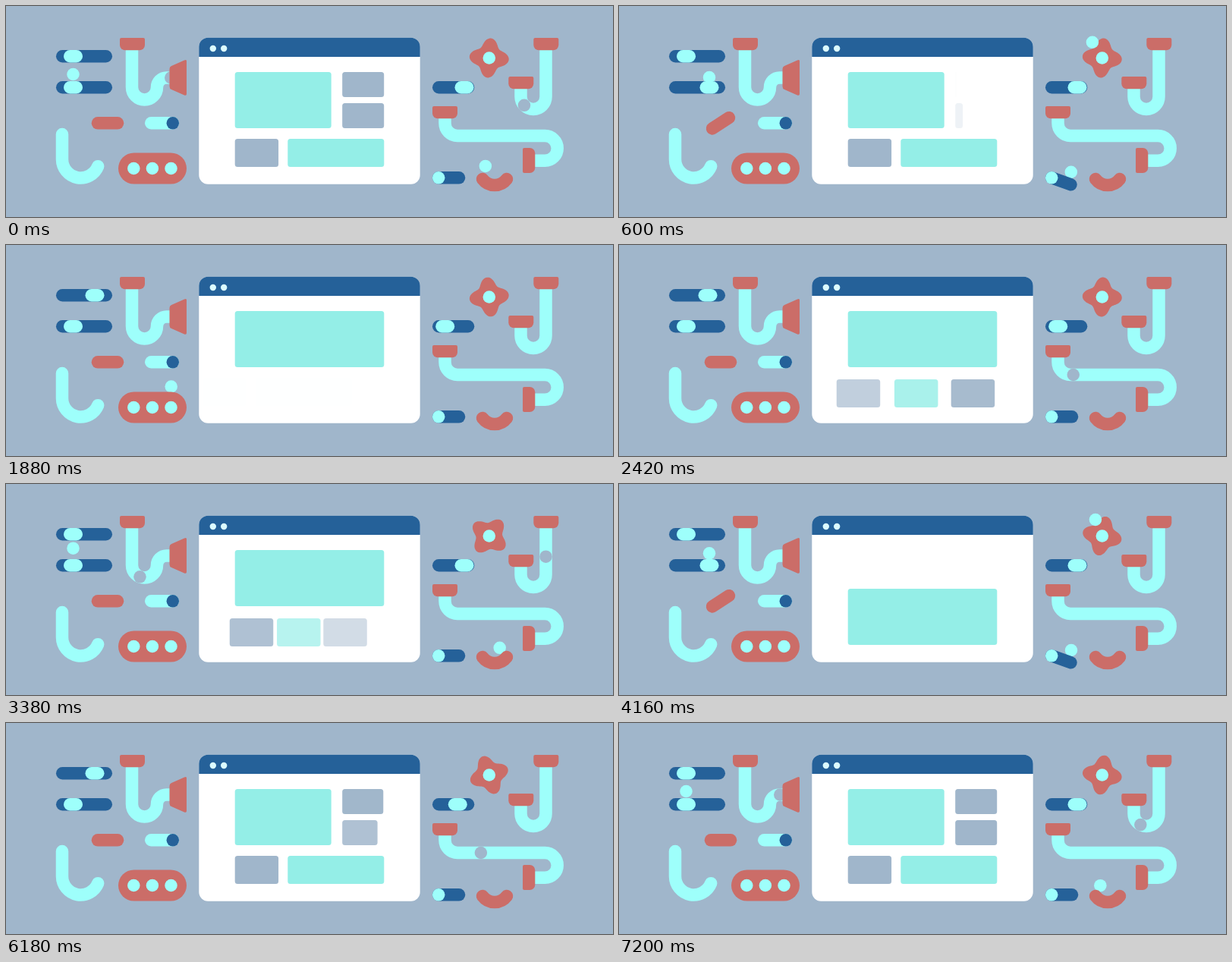
Write an HTML page with a canvas that moves like this. It is 800 px wide and 278 px high and loops after 7.22 s.

```html
<!DOCTYPE html>
<html lang="en">
<head>
<meta charset="utf-8">
<title>Page machine</title>
<style>
html, body { margin: 0; width: 100%; height: 100%; overflow: hidden; background: #a0b6cb; }
canvas { display: block; width: 800px; height: 278px; }
</style>
</head>
<body>
<canvas id="stage" width="800" height="278"></canvas>
<script>
const LOOP = 7220, RUN = LOOP / 2;   // the balls run twice per loop
const GRAVITY = 1045;                // px per second squared
const BG = '#a0b6cb', BLUE = '#256199', MINT = '#9efffb', PANEL = '#94eee7', RED = '#cb6d68';
const ctx = document.getElementById('stage').getContext('2d');

const clamp = v => Math.max(0, Math.min(1, v));
const lerp = (a, b, u) => a + (b - a) * u;
const smooth = u => u * u * (3 - 2 * u);
const ramp = (t, a, b) => smooth(clamp((t - a) / (b - a)));
const pulse = (t, a, b, c, d) => ramp(t, a, b) - ramp(t, c, d);

function box(x, y, w, h, r, color, alpha = 1) {
  if (alpha <= 0 || w <= 0) return;
  ctx.globalAlpha = alpha;
  ctx.fillStyle = color;
  ctx.beginPath();
  ctx.roundRect(x, y, w, h, r);
  ctx.fill();
  ctx.globalAlpha = 1;
}
const pill = (x, y, w, color) => box(x, y, w, 16.5, 8.25, color);
const cap = (x, y) => box(x, y, 33, 16.3, [2, 2, 7, 7], RED);

function dot(x, y, color = MINT, r = 8.25) {
  ctx.fillStyle = color;
  ctx.beginPath();
  ctx.arc(x, y, r, 0, 7);
  ctx.fill();
}

function turned(x, y, deg, draw) {
  ctx.save();
  ctx.translate(x, y);
  ctx.rotate(deg * Math.PI / 180);
  draw();
  ctx.restore();
}

// A tube that can be stroked and measured along its length
function tube(d) {
  const el = document.createElementNS('http://www.w3.org/2000/svg', 'path');
  el.setAttribute('d', d);
  return { shape: new Path2D(d), length: el.getTotalLength(), at: s => el.getPointAtLength(s) };
}
function stroke(shape, color, ends = 'butt') {
  ctx.strokeStyle = color;
  ctx.lineWidth = 16.5;
  ctx.lineCap = ends;
  ctx.stroke(shape);
}
function flow(pipe, s) {
  if (s <= 0 || s >= pipe.length) return;
  const q = pipe.at(s);
  dot(q.x, q.y, BG);
}

const sPipe = tube('M166 50V107A16.5 16.5 0 0 0 199 107A12.5 12.5 0 0 1 211.5 94.5H238');
const uPipe = tube('M711.5 50V119.5A16.5 16.5 0 0 1 678.5 119.5V101');
const longPipe = tube('M578.5 140V154.5A16.5 16.5 0 0 0 595 171H710.3A16.4 16.4 0 0 1 710.3 203.8H688');
const hook = new Path2D('M74 169V202A24.5 24.5 0 0 0 121.2 211.2');
const smile = new Path2D('M628 228A20 20 0 0 0 660 228');
const funnel = new Path2D('M215.5 83Q215.5 80 218 79L235 71.5Q238 70 238 72.5V116Q238 118.5 235 117.5L218 110Q215.5 109 215.5 106Z');

// Draws a ball on a chain of legs: roll is steady, ride is eased, fly is ballistic
function ball(p, t, x, y) {
  function leg(ms, nx, ny, ease, g) {
    for (const now of [p, p + RUN]) {
      if (now < t || now >= t + ms) continue;
      const u = (now - t) / ms, s = ease ? smooth(u) : u;
      dot(lerp(x, nx, s), lerp(y, ny, s) - g / 2 * (ms / 1000) ** 2 * u * (1 - u));
    }
    t += ms;
    x = nx;
    y = ny;
    return chain;
  }
  const chain = {
    roll: (ms, nx = x, ny = y) => leg(ms, nx, ny, false, 0),
    ride: (ms, nx, ny = y) => leg(ms, nx, ny, true, 0),
    fly: (ms, nx, ny, g = GRAVITY) => leg(ms, nx, ny, false, g)
  };
  return chain;
}

function balls(p) {
  // Out of the cap, through both sliders, over hook and conveyor, into the page
  ball(p, 2750, 160, 50).roll(170, 117).ride(180, 88.5).roll(20).fly(280, 88.5, 90)
    .roll(340).ride(350, 119, 91).roll(50).fly(440, 119, 195)
    .roll(230).fly(300, 176, 186.5).roll(420, 222).fly(230, 266, 200);
  // Out of the funnel
  ball(p, 80, 238, 94.5).roll(90, 264);
  // Over the gear, onto the slider, into the long pipe
  ball(p, 140, 678.5, 101).fly(410, 628, 47, 1.65 * GRAVITY).fly(300, 604, 90.5)
    .roll(350).ride(330, 578.7).roll(30).fly(300, 578.7, 140);
  // Out of the long pipe, off the cradle, flipped into the page
  ball(p, 3230, 688, 203.8).fly(170, 646, 219).roll(165, 637.6).fly(345, 594.5, 212)
    .ride(180, 596, 219).roll(120).fly(300, 534, 200);
}

function slider(x, y, w, knob) {
  pill(x, y, w, BLUE);
  pill(knob - 12.5, y, 25, MINT);
}

function gear(p) {
  turned(636.8, 68.5, 5 - 540 * p / RUN, () => {
    ctx.fillStyle = RED;
    ctx.beginPath();
    for (let a = 0; a < 2 * Math.PI; a += Math.PI / 60) {
      const r = 21.7 + 4.3 * Math.cos(4 * a);
      ctx.lineTo(r * Math.cos(a), r * Math.sin(a));
    }
    ctx.fill();
  });
  dot(636.8, 68.5);
}

function leftSide(p) {
  const late = p < RUN / 2 ? p + RUN : p;   // pipe balls cross the end of a run
  slider(66, 58, 74, 88.5 + 28.5 * pulse(p, 600, 900, 2920, 3100));
  slider(66, 99, 74, 88.5 + 30.5 * pulse(p, 130, 480, 650, 950));

  stroke(sPipe.shape, MINT);
  flow(sPipe, 0.25 * (late - 3074));
  cap(150, 42);
  ctx.fillStyle = RED;
  ctx.fill(funnel);

  turned(134, 154.3, -33 * pulse(p, 230, 550, 700, 1300), () => pill(-21.3, -8.25, 42.6, RED));
  pill(183, 146, 45, MINT);
  dot(219.8, 154.3, BLUE);
  stroke(hook, MINT, 'round');
  box(148, 193.5, 90, 41, 20.5, RED);
  for (let i = 0; i < 3; i++) dot(168.3 + 24.6 * i, 214);
}

function rightSide(p) {
  const late = p < RUN / 2 ? p + RUN : p;
  slider(562, 99, 55.3, 604 - 25.3 * pulse(p, 1200, 1530, 2450, 2650));

  stroke(uPipe.shape, MINT);
  flow(uPipe, 0.275 * (late - 3215));
  cap(695.3, 42);
  cap(662.3, 93);

  stroke(longPipe.shape, MINT);
  const s = (p - 2420) / 1000;
  if (p > 2000) flow(longPipe, 44 + 170 * s + 72 * s * s);
  cap(562, 132);
  box(681, 187, 16.3, 33, [2, 7, 7, 2], RED);

  const tilt = 19.5 * ramp(p, 300, 480) - 79.5 * ramp(p, 600, 900) + 60 * ramp(p, 1200, 1450);
  turned(570.2, 226.3, tilt, () => pill(-8.25, -8.25, 43.3, BLUE));
  dot(570.2, 226.3);
  stroke(smile, RED, 'round');
}

function page(t) {
  const tile = (x, y, w, h, color, alpha) => box(x, y, w, h, 3.5, color, alpha);
  box(254.3, 41.7, 291.4, 193, 12, '#fff');
  box(254.3, 41.7, 291.4, 25.2, [12, 12, 0, 0], BLUE);
  for (let i = 0; i < 2; i++) dot(272.8 + 14.4 * i, 56, '#dcfbff', 4.2);

  // Small pair beside the main block
  for (let i = 0; i < 2; i++) {
    const d = 52 * i;
    const on = 1 - pulse(t, 330 + d, 630 + d, 5904 + d, 6204 + d);
    tile(443.2, 87 + 41 * i, 55 * on, 33, BG, on);
  }

  // A narrow and a wide tile
  const rowY = t < LOOP / 2 ? 175 : 87 + 88 * ramp(t, 5350, 5750);
  for (let i = 0; i < 2; i++) {
    const on = 1 - pulse(t, 1500, 1900, 4400 + 90 * i, 4800 + 90 * i);
    tile(301.7 + 69.6 * i - 43 * (1 - on), rowY, i ? 127 : 57.4, 37, i ? PANEL : BG, on);
  }

  // Row of three, the right one first
  for (let i = 0; i < 3; i++) {
    const d = 46 * (2 - i);
    const on = pulse(t, 2088 + d, 2488 + d, 3200 + d, 3550 + d);
    tile(301.7 + 69.6 * i - 43 * (1 - on), 177, 57.5, 37, i === 1 ? PANEL : BG, on);
  }

  // Main block
  const wide = pulse(t, 600, 1000, 5750, 6140), low = pulse(t, 3600, 4050, 5350, 5750);
  tile(301.7, 87 + 51 * low, 127 + 69.6 * wide, 74, PANEL);
}

function draw(t) {
  const p = t % RUN;
  ctx.fillStyle = BG;
  ctx.fillRect(0, 0, 800, 278);
  gear(p);
  balls(p);
  leftSide(p);
  rightSide(p);
  page(t);
}

const begin = performance.now();
function frame(now) {
  draw(Math.max(0, now - begin) % LOOP);
  requestAnimationFrame(frame);
}
draw(0);
requestAnimationFrame(frame);
</script>
</body>
</html>
```
